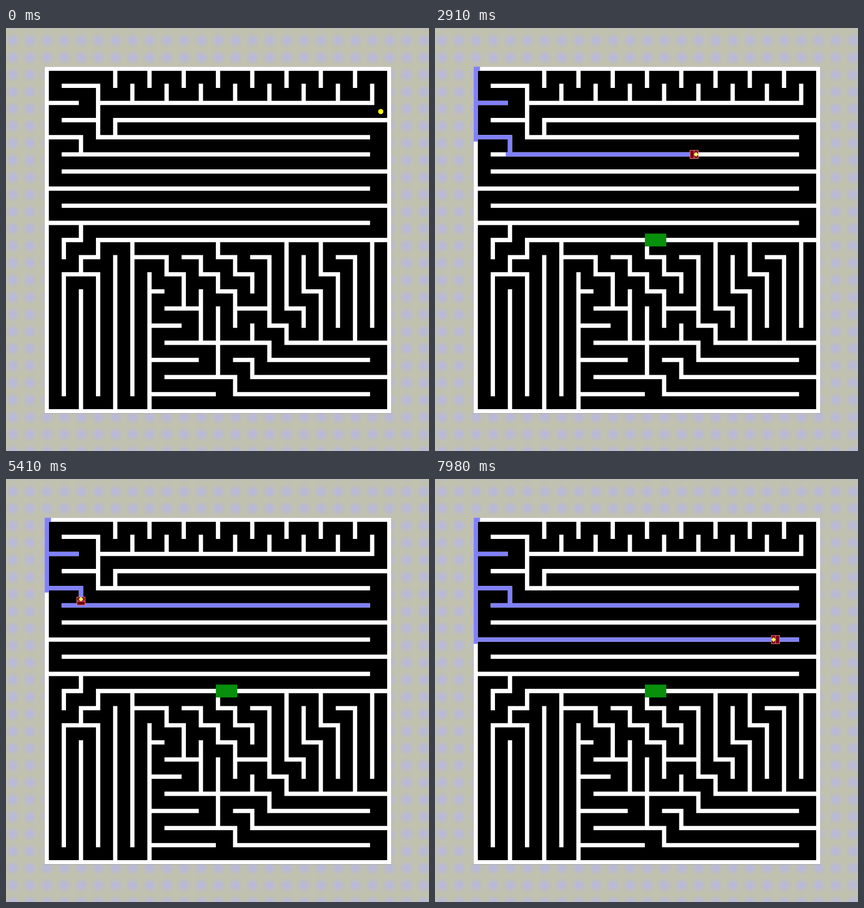
An HTML page for the animation above (8 s loop, 748 by 748 pixels).

```html
<!DOCTYPE html>
<html lang="en">
<head>
<meta charset="utf-8">
<title>Maze solver</title>
<style>
  html, body { margin: 0; width: 100%; height: 100%; overflow: hidden; background: #c1c1b0; }
  svg { display: block; width: 100vw; height: 100vh; }
</style>
</head>
<body>
<svg viewBox="0 0 748 748">
  <defs>
    <radialGradient id="blob">
      <stop offset="0" stop-color="#b8b8e0"/>
      <stop offset=".45" stop-color="#b9b9d6" stop-opacity=".85"/>
      <stop offset="1" stop-color="#bebec0" stop-opacity="0"/>
    </radialGradient>
    <pattern id="spots" x="-3.1" y="6.9" width="30.28" height="30.28" patternUnits="userSpaceOnUse">
      <circle cx="15.14" cy="15.14" r="14" fill="url(#blob)"/>
    </pattern>
    <clipPath id="open"><path id="clipShape"/></clipPath>
  </defs>
  <rect width="748" height="748" fill="#c1c1b0"/>
  <rect width="748" height="748" fill="url(#spots)"/>
  <g id="maze" transform="translate(68.2 68.2) scale(7.573)">
    <rect width="81" height="81"/>
    <path id="halls" fill="#fff"/>
    <circle id="dot" cx="78.5" cy="10.5" r=".6" fill="#ff0"/>
    <rect id="goal" x="40" y="39" width="5" height="3" fill="#08900c"/>
    <g id="trail" clip-path="url(#open)">
      <path id="track" fill="none" stroke="#8080fa" stroke-width="2" stroke-linecap="square"/>
    </g>
    <g id="car">
      <path d="M-.95-.95H.95V.95H-.95ZM0-.95V.95" fill="#780010" stroke="#f08088" stroke-width=".14"/>
      <path d="M-.08 0L.45-.56L.98 0L.45.56Z" fill="#ffff60"/>
    </g>
  </g>
</svg>
<script>
const $ = id => document.getElementById(id);
const LOOP = 8000, FRAME = 33.38;

// Corridors as runs between grid nodes; one node every 4 cells.
const rows = {
  0: '0-20', 1: '1-3', 2: '0-2 3-19', 3: '1-3 4-20', 4: '0-2 3-19', 5: '1-19',
  10: '1-2 3-20', 11: '2-3 5-7 8-9 10-11 12-13 17-18',
  12: '1-3 7-8 9-10 11-12 16-17', 13: '6-7 10-11 15-16', 14: '7-9 11-13 14-15',
  15: '6-8 13-14', 16: '7-13 14-20', 17: '6-9 11-12 13-19',
  18: '7-11 12-20', 19: '6-10 11-19', 20: '0-20'
};
for (let y = 6; y < 10; y++) rows[y] = y % 2 || y === 9 ? '0-19' : '1-20';

const cols = {
  0: '0-20', 1: '10-11 12-19', 2: '4-5 9-10 11-12 13-20', 3: '1-4 10-11 12-19',
  4: '3-4 11-20', 5: '10-19', 6: '12-20', 7: '11-12', 8: '12-14', 9: '11-12 13-16',
  10: '10-11 12-13 14-18', 11: '11-12 13-15 18-19', 12: '12-13 15-16 17-18',
  13: '11-15 16-17', 14: '10-14 15-16', 15: '11-13 14-15', 16: '10-12 13-16',
  17: '12-15', 18: '11-16', 19: '10-15', 20: '0-20'
};
for (let x = 4; x < 20; x++) cols[x] += x % 2 ? ' 1-2' : ' 0-1';

const box = (x, y, w, h) => `M${x} ${y}h${w}v${h}h${-w}z`;
const runs = (lines, draw) => Object.entries(lines).map(([line, text]) =>
  text.split(' ').map(run => {
    const [a, b] = run.split('-').map(n => n * 4);
    return draw(line * 4, a, b - a);
  }).join('')).join('');

// Horizontal runs stop one cell short of their last node.
const shape = runs(rows, (y, x, n) => box(x, y, n, 1)) + runs(cols, (x, y, n) => box(x, y, 1, n + 1));
$('halls').setAttribute('d', shape);
$('clipShape').setAttribute('d', shape);

// Left-hand walk; quarter turns cost 1 step, turning back costs 3.
const route = [[0, 0], [0, 8], [8, 8], [0, 8], [0, 16], [8, 16], [8, 20], [76, 20], [4, 20],
  [8, 20], [8, 16], [0, 16], [0, 28], [76, 28], [0, 28]];
let clock = 0;
const legs = route.slice(1).map(([x, y], i) => {
  const [px, py] = route[i];
  const dx = Math.sign(x - px), dy = Math.sign(y - py);
  return { px, py, dx, dy, len: Math.abs(x - px + y - py), dir: Math.atan2(dy, dx) * 180 / Math.PI };
});
legs.forEach((leg, i) => {
  const prev = legs[i - 1];
  leg.turn = prev ? (leg.dir - prev.dir + 540) % 360 - 180 : 0;
  leg.wait = Math.abs(leg.turn) === 180 ? 3 : leg.turn ? 1 : 0;
  leg.start = clock;
  clock += leg.wait + leg.len;
});

// [frame, steps spent]
const pace = [[0, 0], [24, 0], [39, 24], [69, 68], [106, 123], [140, 173], [185, 236], [239, 315], [240, 316]];

function stepsAt(n) {
  let i = 0;
  while (i < pace.length - 2 && n >= pace[i + 1][0]) i++;
  const [n0, s0] = pace[i], [n1, s1] = pace[i + 1];
  return Math.round(s0 + (s1 - s0) * (n - n0) / (n1 - n0));
}

function show(el, on) { el.style.display = on ? '' : 'none'; }

function render(t) {
  const n = Math.floor((t + 4) / FRAME);
  const running = n > 0;
  show($('dot'), !running);
  for (const id of ['goal', 'trail', 'car']) show($(id), running);
  if (!running) return;

  const steps = stepsAt(n);
  let path = '', x, y, angle, atTip;
  for (const leg of legs) {
    const spent = steps - leg.start;
    if (spent < 0 || (spent === 0 && leg.start > 0)) break;
    const go = Math.max(0, Math.min(leg.len, spent - leg.wait));
    x = leg.px + leg.dx * go + .5;
    y = leg.py + leg.dy * go + .5;
    const part = leg.wait ? Math.min(1, spent / leg.wait) : 1;
    angle = leg.dir - leg.turn + Math.round(leg.turn * part / 90) * 90;
    atTip = leg.wait === 3 && spent === 3 && leg.dx < 0;
    path += `M${leg.px + .5} ${leg.py + .5}L${x} ${y}`;
  }
  $('track').setAttribute('d', path);
  $('car').setAttribute('transform', `translate(${x} ${y}) rotate(${angle})`);
  // Just after turning at an open end, the trail overlaps the car.
  $('maze').insertBefore($('car'), atTip ? $('trail') : null);
}

const origin = performance.now();
function tick() {
  render((performance.now() - origin) % LOOP);
  requestAnimationFrame(tick);
}
tick();
</script>
</body>
</html>
```
